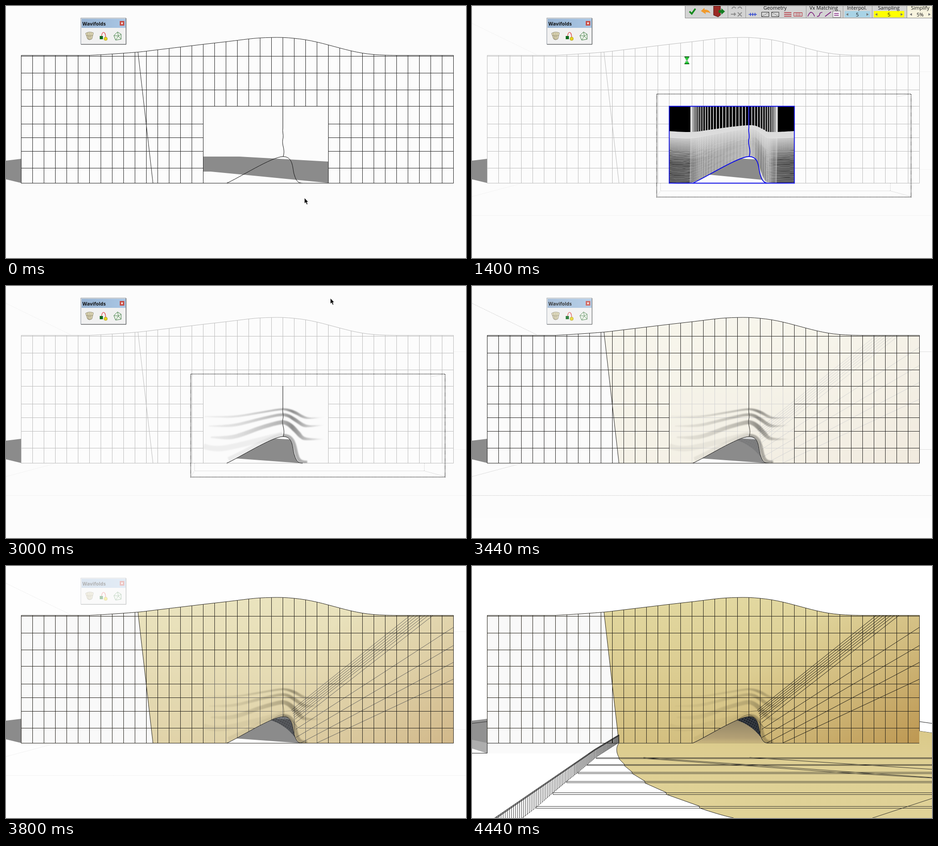
These frames come from a looping animation (1011 by 554 pixels, 5240 ms). An HTML page:

```html
<!DOCTYPE html>
<html lang="en">
<head>
<meta charset="utf-8">
<title>Lofted facade</title>
<style>
html, body { margin: 0; width: 100%; height: 100%; overflow: hidden; background: #fcfcfc; }
svg { display: block; width: 1011px; height: 554px; }
path, line, polyline { fill: none; }
text { font-family: "Open Sans", "Noto Sans", sans-serif; }
</style>
</head>
<body>
<svg id="stage" viewBox="0 0 1011 554" xmlns="http://www.w3.org/2000/svg"></svg>
<script>
const LOOP = 5240, BLUE = '#0a0ae6', SHADE = '#8b8b8b';

// Catmull-Rom spline through a few points
function smooth(p) {
  let d = `M${p[0]}`;
  for (let i = 0; i < p.length - 1; i++) {
    const a = p[i - 1] || p[i], b = p[i], c = p[i + 1], e = p[i + 2] || c;
    d += `C${b[0] + (c[0] - a[0]) / 6},${b[1] + (c[1] - a[1]) / 6} ` +
         `${c[0] - (e[0] - b[0]) / 6},${c[1] - (e[1] - b[1]) / 6} ${c}`;
  }
  return d;
}
const range = (n, f) => Array.from({ length: n }, (_, i) => f(i)).join('');
const line = (a, b, c, d, extra = '') => `<line x1="${a}" y1="${b}" x2="${c}" y2="${d}" ${extra}/>`;
const path = (d, extra = '') => `<path d="${d}" ${extra}/>`;
const fill = (d, color, extra = '') => `<path d="${d}" style="fill:${color}" ${extra}/>`;
const rect = (x, y, w, h, extra = '') => `<rect x="${x}" y="${y}" width="${w}" height="${h}" ${extra}/>`;
const group = (extra, body) => `<g ${extra}>${body}</g>`;

// Shapes of the building
const crest = [[183,108.5],[233,105.5],[290,101.3],[333,96.3],[383,90.3],[433,84.3],[483,78.6],[533,72.5],[558,70.2],
  [583,69.2],[608,69.2],[633,71],[658,74.2],[683,79.2],[708,85.5],[733,92.2],[758,98.5],[783,103.5],[808,106.6],[833,108],[858,108.5]];
const TOP = `M33.5,108.5L${smooth(crest).slice(1)}H983.5`;
const RIGHT_TOP = `${smooth(crest.slice(2))}H983.5`;
const ARCH = 'M485,389.5C510,379 585,331 609,331C633,331 629,360 634,372C638,385 642,389.5 652,389.5';
const CREASE = 'M608.5,220V268C607,275 610,283 609,290C607,297 608,303 609,308C611,316 612,323 609,331';
const WALL = `${TOP}V389.5H33.5Z${ARCH}Z`;
const SURFACE = `M433.5,220.5H708.5V389.5H433.5Z${ARCH}Z`;
const ROWS = [110, 147, 184, 220, 259, 289, 319, 356, 389].map(y => y + .5);

function grid(color, opening) {
  const cols = range(39, i => {
    const x = 33.5 + 25 * i;
    const end = opening && i > 16 && i < 27 ? 220.5 : 389.5;
    return line(x, 60, x, end);
  });
  const rows = ROWS.map((y, i) => {
    const split = opening ? [433.5, 708.5] : [585, 645];
    const cut = opening ? i > 3 && i < 8 : i > 5 && i < 8;
    return cut ? line(33.5, y, split[0], y) + line(split[1], y, 983.5, y) : line(33.5, y, 983.5, y);
  }).join('');
  return group(`stroke="${color}"`,
    group(`clip-path="url(#${opening ? 'outline' : 'wall'})"`, cols + rows) +
    path(TOP + 'V389.5H33.5V108.5') + line(290, 101, 323, 389.5));
}

function axes(color) {
  return group(`stroke="${color}" stroke-dasharray="1 2"`,
    line(0, 38, 142, 107) + line(984, 144.5, 1011, 144.5) + line(984, 359.5, 1011, 359.5) +
    line(0, 419, 105, 391) + line(0, 460.5, 1011, 460.5));
}

// Ripples on the lofted surface: x, upper edge, thickness
const ripples = [
  [[436,286,2],[500,285,4],[560,276,4],[600,269.5,4],[618,269.5,5],[636,275,7],[652,284,6],[668,289,3],[700,288,1]],
  [[446,307,2],[500,303,6],[560,289,6],[600,280.5,6],[618,281,7],[636,290,9],[652,301,8],[668,306,4],[704,305,1]],
  [[450,331,3],[500,327,9],[560,307,9],[600,296,9],[616,296.5,10],[632,306,14],[646,321,13],[660,333,6],[704,336,1]]
];
const ripple = p => smooth(p.map(([x, y]) => [x, y])) + 'L' +
  smooth(p.map(([x, y, w]) => [x, y + w]).reverse()).slice(1) + 'Z';
const waves = (ink, dy = 0) => group(`filter="url(#soft)" transform="translate(0 ${dy})"`,
  ripples.map(p => fill(ripple(p), `url(#${ink})`)).join(''));
const lip = group('filter="url(#soft)"',
  path('M434,352C470,366 500,352 608,326', 'stroke="#000" stroke-opacity=".05" stroke-width="12"') +
  path('M490,384C520,371 580,336 609,331', 'stroke="#000" stroke-opacity=".06" stroke-width="16"') +
  path('M609,329C637,329 634,360 640,374C643,385 650,388 662,388', 'stroke="#000" stroke-opacity=".3" stroke-width="8"'));
const half = (id, body) => group(`clip-path="url(#surface)"`, group(`clip-path="url(#${id})"`, body));

// Dense preview mesh: rows blend from a crest line to the arch
const meshX = [433, 482, 530, 575, 608, 622, 632, 642, 655, 708];
const crestY = [275, 277, 271, 265, 262, 263, 267, 272, 277, 275];
const archY = [389, 389, 366, 342, 331, 334, 355, 380, 389, 389];
const meshRow = v => smooth(meshX.map((x, i) => [x, crestY[i] + (archY[i] - crestY[i]) * v]));
function mesh() {
  const cols = range(42, i => {
    const x = 576 - 95 * Math.cos(Math.PI * i / 41);
    return path(`M${x},220L${x},270L${x - 2},389`);
  });
  return group('clip-path="url(#surface)"',
    rect(433, 220, 276, 170, 'fill="#000"') +
    group('stroke="#dedede" stroke-width="1.8"', cols) +
    fill(meshRow(0) + 'V390H433Z', '#dcdcdc') +
    group('stroke="url(#meshInk)"', range(34, i => {
      const v = .14 + i * .0255;
      return path(meshRow(v), `stroke-width="${Math.min(1.7, .3 + i * .08)}"`);
    })) +
    group('stroke="#e4e4e4" stroke-width="1.1" opacity=".5"', group('clip-path="url(#lower)"', cols)));
}

const frame = 'M433.5,220.5H708.5V389.5H433.5Z';
const box = group('stroke="#111" stroke-width="1.6" stroke-dasharray="1.6 1.6"', path('M406,193.5H965V420H406Z')) +
  group('stroke="#aaa" stroke-dasharray="1 2"',
    path('M414.5,390V406.5H919.5V390M406,419L414.5,406.5M919.5,406.5L965,419M936,199L965,194M407,194L412,198'));

// Floating palette
const palette = rect(164.5, 26.5, 99, 57.5, 'fill="#f1f1f1" stroke="#8c959e"') +
  path('M165,84.5H264V27', 'stroke="#555"') +
  rect(166, 28, 97, 20, 'fill="url(#title)"') +
  '<text x="168" y="43" font-size="10.5" font-weight="700" fill="#111">Wavifolds</text>' +
  rect(250, 33, 10, 10, 'fill="#c64a42"') + path('M253,36L257,40M257,36L253,40', 'stroke="#fff" stroke-width="1.3"') +
  fill('M175,60Q183,55 192,59L189,72Q184,76 179,72Z', '#e3dcb9', 'stroke="#77705a" stroke-width=".8"') +
  path('M179,59L181,74M183,59V75M187,59L186,74M176,64Q184,68 191,64', 'stroke="#77705a" stroke-width=".7"') +
  path('M210,69C210,54 219,54 219,70', 'stroke="#e05050" stroke-width="1.3"') +
  rect(206, 66, 7, 7, 'fill="#0b6b1d"') + '<circle cx="219" cy="72" r="3.8" fill="#e5d21f" stroke="#8a7c10" stroke-width=".6"/>' +
  fill('M237,65L245,57L253,62L253,73L241,75Z', '#eef3ea', 'stroke="#3f7a45"') +
  path('M237,65L247,66L253,62M247,66L241,75M247,66L253,73M245,57L247,66', 'stroke="#3f7a45" stroke-width=".9"');

// Option bar at the top
const label = (x, y, s, size = 11) => `<text x="${x}" y="${y}" font-size="${size}" text-anchor="middle" fill="#111">${s}</text>`;
const field = (x, w, color, value) => rect(x, 11, w, 14, `fill="${color}"`) + label(x + w / 2, 22.5, value) +
  fill(`M${x + 8},15.5V21.5L${x + 3},18.5Z`, '#777') + fill(`M${x + w - 8},15.5V21.5L${x + w - 3},18.5Z`, '#777');
const optionBar = rect(468, 0, 543, 26.5, 'fill="#d3d3d3"') + path('M468.5,0V26.5H1011', 'stroke="#888"') +
  path('M562.5,0V26M601.5,0V26M734.5,0V26M815.5,0V26M879.5,0V26M955.5,0V26', 'stroke="#999"') +
  path('M478,12L483,17L491,6', 'stroke="#118a1b" stroke-width="3.6"') +
  fill('M503,11L511,4V8Q521,7 524,16Q519,13 513,14L514,18Z', '#f09a2c') +
  fill('M531,0H546V20L541,24L531,20Z', '#9b2a25', 'stroke="#51120f"') +
  fill('M542,9H548V5L556,12L548,19V15H542Z', '#147d22') +
  path('M571,6Q575,-1 580,5M584,5Q590,-1 593,6M569,18H579M576,15L579,18L576,21M584,14L593,23M593,14L584,23', 'stroke="#8b8b8b" stroke-width="2"') +
  path('M608,18.5H626M612,15V22M617,15V22M622,15V22', 'stroke="#2940d0" stroke-width="1.5"') +
  group('stroke="#333"', path('M636.5,13.5H652.5V23.5H636.5ZM658.5,13.5H674.5V23.5H658.5Z') +
    path('M637,23L652,14M659,14L674,23', 'stroke-dasharray="2 2"')) +
  path('M686,14.5H702M686,18.5H702M686,22.5H702', 'stroke="#b22b35" stroke-width="1.4"') +
  path('M707,14.5H725M707,22.5H725M707.5,14V23M712.5,14V23M716.5,14V23M720.5,14V23M725.5,14V23', 'stroke="#b22b35"') +
  rect(793, 11, 17, 14, 'fill="#f4f0f4" stroke="#777"') +
  path('M738,23Q742,13 746,14T753,23M758,23C768,23 760,14 770,14M776,23L789,13M796,16.5H806M796,20.5H806', 'stroke="#7c1c7c" stroke-width="1.6"') +
  label(666, 8, 'Geometry') + label(773, 8, 'Vx Matching') + label(846, 8, 'Interpol.') +
  rect(957, 0, 54, 26, 'fill="#f2efdc"') + label(916, 8, 'Sampling') + label(985, 8, 'Simplify') +
  field(819, 56, '#a9d3e6', '5') + field(883, 67, '#ffff00', '5') + field(959, 52, '#f8f4df', '5%');

const cursor = (x, y) => group(`transform="translate(${x} ${y})"`,
  fill('M0,0V12L2.8,9.6L5,14.4L7,13.5L5,8.9H8.4Z', '#000', 'stroke="#fff" stroke-width=".6"'));
const hourglass = sand => rect(467, 111, 10.5, 2, 'fill="#0a6a14"') + rect(467, 126, 10.5, 2, 'fill="#0a6a14"') +
  fill('M468,113H476.5L473,119.5L476.5,126H468L471.5,119.5Z', '#fff', 'stroke="#0a7a16"') +
  fill(sand ? 'M468.5,113.5H476L472.3,119Z' : 'M468.5,113.5H476L472.3,119ZM468.5,126H476L472.3,121Z', '#17d42b');

// Finished facade
const NICHE = 'M582,339C595,333 605,331 611,331C629,331 629,354 636,378C626,364 608,347 582,339Z';
const floor = color => group('clip-path="url(#arch)"', fill('M495,378.3L513,331L708,342V394Z', color));
const niche = color => fill(NICHE, color) + fill(NICHE, 'url(#weave)') + path(ARCH, 'stroke="#222"');
const leftShade = fill('M0,340L33,336V389L0,381Z', SHADE);
const bundle = range(6, i => line(627 + 1.6 * i, 317 + 4 * i, 888 + 8 * i, 109));
const rays = [[637,344,938,109],[637,359,983,135],[637,377,983,175],[648,389,983,212],[683,389,983,249]];
const finished = rect(0, 0, 1011, 554, 'fill="#fff"') + leftShade +
  fill(TOP + 'V389.5H33.5Z', '#f9f9f9') +
  rect(433, 331, 276, 59, 'fill="#fff"') + floor(SHADE) +
  group('clip-path="url(#wall)"',
    fill(`${RIGHT_TOP}V389.5H323Z`, 'url(#gold)') + fill(`${RIGHT_TOP}V389.5H323Z`, 'url(#bronze)') +
    group('opacity=".5"', waves('ink')) + group('opacity=".7"', lip)) +
  grid('#26231a', false) +
  group('stroke="#1c1a14"', bundle + rays.map(r => line(...r)).join('') +
    path('M645,319.5C628,316 615,322 585,319.5M645,356.5C632,350 630,333 609,327C598,328 590,334 585,337', 'stroke-opacity=".6"')) +
  niche('#202226');

// Stairs, railing and forecourt
const railTop = x => x > 270 ? 371 + (323 - x) * .604 : 403 + (270 - x) * .686;
const railLow = x => x > 273 ? 388 + (323 - x) * .64 : 420 + (273 - x) * .835;
const stairs = [[273,421,2],[253,436,2],[233,453,3],[208,473,3],[178,498,4],[141,528,4]];
const EDGE = 'M323,389C315,400 318,412 323,421V424L335,436V439L352,453V456L380,473V477L427,498V502L500,528V532Q540,546 575,554';
const forecourt = rect(0, 390, 1011, 164, 'fill="#fff"') + rect(984, 340, 27, 60, 'fill="#fff"') +
  rect(0, 336, 33, 76, 'fill="#fff"') +
  fill('M0,340L33,336V411.5L0,401Z', '#919191') + fill('M0,382L33,389V411.5L0,401Z', '#adadad') +
  path('M0,346L33,342', 'stroke="#333"') +
  path('M0,411.5H33.5V389M983,342L1011,346M983,363L1011,367', 'stroke="#222"') +
  rect(34, 390, 289, 22, 'fill="#fafafa"') +
  fill(EDGE + 'H1011V367L983,363V389.5Z', 'url(#court)') + path(EDGE, 'stroke="#222"') +
  fill(ARCH + 'Z', 'url(#brown)') + niche('#161a20') +
  group('stroke="#222" stroke-width=".9"',
    group('transform="translate(0 .5)"', stairs.map(([x, y, gap]) =>
      line(x, y, 1011, y) + line(x, y + gap, 1011, y + gap) + line(x, y, x, y + gap)).join('')) +
    path('M377,421L588,435.5L835,453L1011,465M377,423L588,438L835,456L1011,466M610,421L1011,447M880,554L1011,511') +
    path('M33,389.5H485M650,389.5H983') +
    path('M323,371L270,403L50,554M323,373L270,405L54,554', 'stroke-width="1.2"') +
    path('M323,388L273,420L235,452L208,473L178,498L141,531L110,554', 'stroke-width=".6"') +
    range(86, i => {
      const x = 323 - i * 1.8 - i * i * .018;
      return line(x, railTop(x), x, Math.min(554, railLow(x)), `stroke-width="${i < 40 ? 1.15 : .9}"`);
    }));

const stops = list => list.map(([o, c, a = 1]) => `<stop offset="${o}" stop-color="${c}" stop-opacity="${a}"/>`).join('');
const gradient = (id, coords, list) => {
  const [a, b, c, d] = coords;
  return `<linearGradient id="${id}" gradientUnits="userSpaceOnUse" x1="${a}" y1="${b}" x2="${c}" y2="${d}">${stops(list)}</linearGradient>`;
};
const clip = (id, d) => `<clipPath id="${id}"><path d="${d}" clip-rule="evenodd"/></clipPath>`;
const defs = `<defs>
  ${clip('outline', TOP + 'V390H33Z')}${clip('wall', WALL)}${clip('surface', SURFACE)}${clip('arch', ARCH + 'Z')}
  ${clip('west', 'M433,220H608.5V390H433Z')}${clip('east', 'M608.5,220H709V390H608.5Z')}
  ${clip('lower', meshRow(.1) + 'V390H433Z')}
  ${gradient('ink', [436, 0, 700, 0], [[0, '#000', .05], [.3, '#000', .12], [.64, '#000', .28], [.73, '#000', .44], [.83, '#000', .26], [1, '#000', 0]])}
  ${gradient('paleInk', [436, 0, 700, 0], [[0, '#000', .03], [.4, '#000', .09], [.65, '#000', .2]])}
  ${gradient('steel', [608, 0, 705, 0], [[0, '#4a5a66', .8], [.3, '#4a5a66', .85], [.6, '#4a5a66', .4], [1, '#4a5a66', 0]])}
  ${gradient('shine', [608, 0, 705, 0], [[0, '#d5e2ea', .5], [.4, '#d5e2ea', .6], [1, '#d5e2ea', 0]])}
  ${gradient('meshInk', [433, 0, 708, 0], [[0, '#000'], [.17, '#111'], [.24, '#666', .8], [.65, '#999', .5], [.8, '#555', .7], [.84, '#111'], [1, '#000']])}
  ${gradient('title', [166, 0, 262, 0], [[0, '#97b3d2'], [1, '#a9c6e4']])}
  ${gradient('gold', [0, 69, 0, 390], [[0, '#e2d8a0'], [.5, '#dccd92'], [1, '#d3bf80']])}
  ${gradient('bronze', [720, 130, 983, 389], [[0, '#b07f35', 0], [.5, '#b18540', .26], [1, '#b07f35', .62]])}
  ${gradient('court', [0, 370, 0, 554], [[0, '#dbca8a'], [.4, '#dfd095'], [1, '#e0d297']])}
  ${gradient('brown', [0, 335, 0, 392], [[0, '#8e8264'], [.75, '#b3a075'], [1, '#cdba80']])}
  <filter id="soft" x="-20%" y="-40%" width="140%" height="180%"><feGaussianBlur stdDeviation="1.3"/></filter>
  <pattern id="weave" width="5" height="5" patternUnits="userSpaceOnUse" patternTransform="rotate(28)">
    <path d="M0,0H5M0,0V5M0,5L5,0" stroke="#8f99a3" stroke-width=".5"/></pattern></defs>`;

const east = rect(608, 220, 101, 170, 'fill="#fbfbfb"') + waves('ink') + lip;
const eastBack = rect(608, 220, 101, 170, 'fill="#a2afb7"') + waves('shine', 8) + waves('steel') + lip;
const west = ink => rect(433, 220, 176, 170, 'fill="#fbfbfb"') + waves(ink) + lip;

// Layers from back to front, each with its [from, to] times
const layers = [
  [[[200, 400], [3200, 4440]], axes('#909090')],
  [[[400, 3200]], axes('#e2e2e2')],
  [[[0, LOOP]], leftShade],
  [[[0, 1600]], fill('M433,331H513L708,342V389L450,364H433Z', SHADE)],
  [[[1600, 4440]], floor(SHADE)],
  [[[1000, 1600]], mesh()],
  [[[1600, 2400]], half('west', west('paleInk'))],
  [[[2400, 4440]], half('west', west('ink'))],
  [[[1600, 2600]], half('east', eastBack)],
  [[[2600, 4440]], half('east', east)],
  [[[0, 400], [3200, 4440]], grid('#262626', true)],
  [[[400, 3200]], grid('#bdbdbd', true)],
  [[[0, 400]], path(frame, 'stroke="#222"')],
  [[[400, 3200]], path(frame, 'stroke="#bbb"')],
  [[[0, 600], [1600, 4440]], path(ARCH + CREASE, 'stroke="#111"')],
  [[[600, 1600]], path(frame + ARCH + CREASE, `stroke="${BLUE}" stroke-width="1.8"`)],
  [[[400, 2200], [3000, 3200]], box],
  [[[2000, 2200]], path('M433,220H709V389.5H433Z', `stroke="${BLUE}" stroke-width="2.4"`) +
    path('M434,220.5H712.5V391H434Z', `stroke="${BLUE}" stroke-width="1.5"`)],
  [[[0, 4040]], palette],
  [[[800, 1200]], rect(229.5, 51.5, 31, 30, 'fill="#8fb8e0" fill-opacity=".25" stroke="#7fa6cc"')],
  [[[1000, 2000]], optionBar],
  [[[0, 400]], cursor(656, 422)],
  [[[400, 800]], cursor(640, 378)],
  [[[800, 1200]], cursor(246, 66)],
  [[[1200, 1400]], hourglass(true)],
  [[[1400, 1800]], hourglass(false)],
  [[[2000, 2600]], cursor(654, 261)],
  [[[2600, 2800]], cursor(713, 17)],
  [[[2800, 3200]], cursor(713, 27)],
  [[[3320, LOOP]], finished, 'fade'],
  [[[4440, LOOP]], forecourt]
];

const stage = document.getElementById('stage');
stage.innerHTML = defs + rect(0, 0, 1011, 554, 'fill="#fcfcfc"') +
  layers.map(([, body, name]) => group(`class="layer ${name || ''}"`, body)).join('');
const nodes = [...stage.querySelectorAll('.layer')];
const fade = stage.querySelector('.fade');

function draw(now) {
  const t = now % LOOP;
  layers.forEach(([spans], i) => {
    nodes[i].style.display = spans.some(([a, b]) => t >= a && t < b) ? '' : 'none';
  });
  const step = Math.floor((t - 3320) / 120);
  fade.style.opacity = Math.max(0, Math.min(1, step / 6));
}
let start;
function tick(now) {
  start ??= now;
  draw(now - start);
  requestAnimationFrame(tick);
}
draw(0);
requestAnimationFrame(tick);
</script>
</body>
</html>
```
